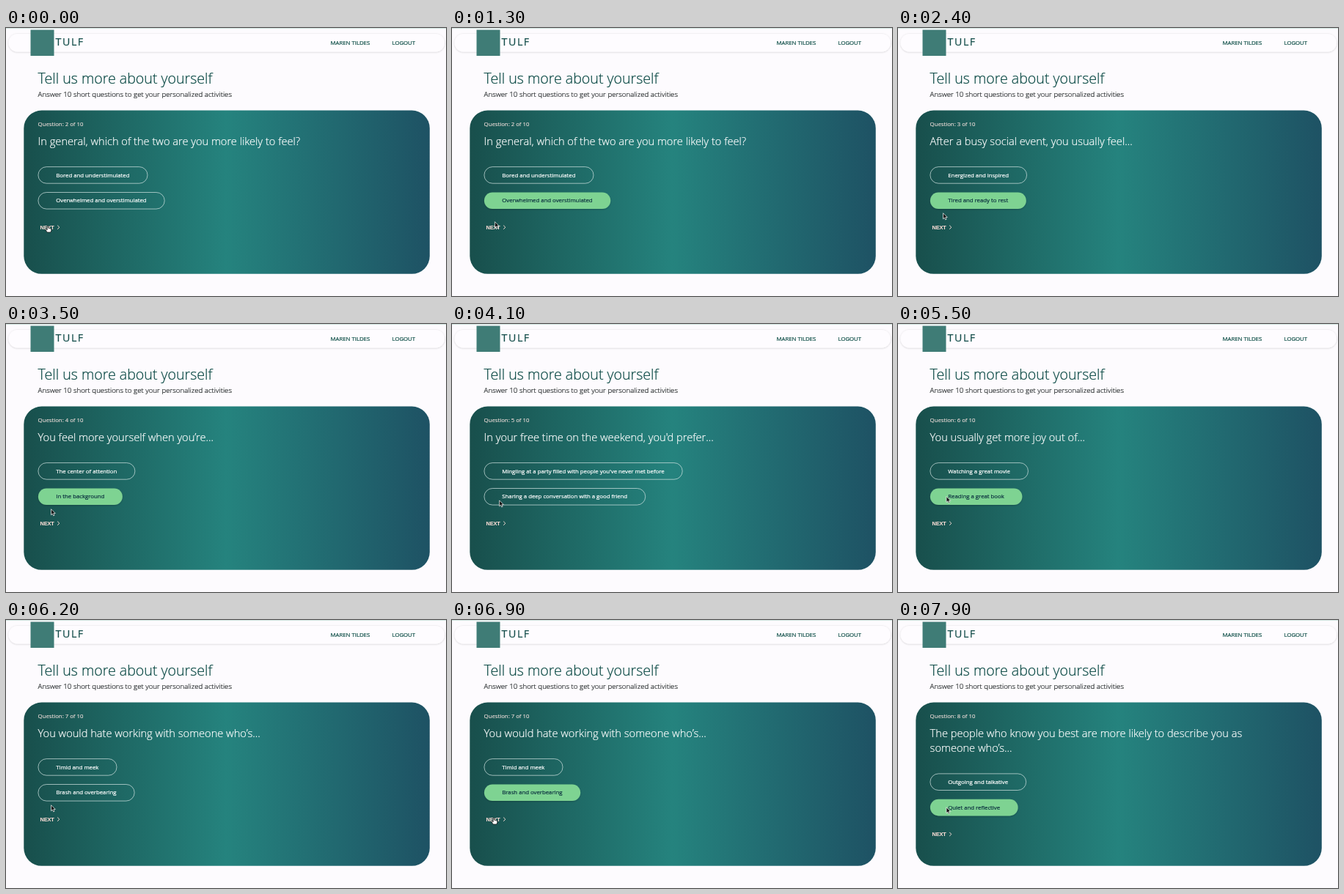
Animation, 600 px wide and 366 px high, one loop 8000 ms. Source, as an HTML page:

```html
<!DOCTYPE html>
<html lang="en">
<head>
<meta charset="utf-8">
<title>Questionnaire</title>
<style>
  html, body { margin: 0; width: 100%; height: 100%; overflow: hidden; background: #fdfbfe; }
  svg { display: block; width: 600px; height: 366px; font: 400 7.77px "Open Sans", sans-serif; }
  text { fill: var(--ink); stroke: var(--ink); stroke-width: .22; }
  .nav { --ink: #0f4f48; }
  .brand { --ink: #17504d; font-size: 14.2px; letter-spacing: 1.6px; }
  .title { --ink: #0b4a45; font-size: 19.6px; font-weight: 300; }
  .intro { --ink: #262b2c; font-size: 9.71px; font-weight: 300; }
  .count { --ink: #f7e3df; stroke-width: .12; }
  .question { --ink: #fff; font-size: 14.63px; font-weight: 300; }
  .option { --ink: #fff; }
  .option rect { fill: none; stroke: #d5e6e4; stroke-width: .7; }
  .option.on { --ink: #0d3341; }
  .option.on rect { fill: #7ed392; stroke: none; filter: url(#soft); }
  .next { --ink: #f8dcd5; font: 700 7.29px "Liberation Sans", Arial, sans-serif; stroke-width: .1; }
</style>
</head>
<body>
<svg viewBox="0 0 600 366">
  <defs>
    <linearGradient id="teal">
      <stop offset="0" stop-color="#184f4c"/>
      <stop offset=".5" stop-color="#25837e"/>
      <stop offset="1" stop-color="#1e5264"/>
    </linearGradient>
    <filter id="soft" x="-10%" y="-30%" width="120%" height="180%">
      <feDropShadow dx="0" dy="1" stdDeviation="1" flood-color="#000" flood-opacity=".22"/>
    </filter>
    <filter id="lift" x="-2%" y="-20%" width="104%" height="150%">
      <feDropShadow dx="0" dy=".5" stdDeviation=".8" flood-color="#000" flood-opacity=".2"/>
    </filter>
  </defs>

  <rect width="600" height="366" fill="#fdfbfe"/>
  <rect width="600" height="1" fill="#d3e6e2"/>
  <rect x="3.5" y="8" width="594.5" height="24.5" rx="12.25" fill="#fefcff" filter="url(#lift)"/>
  <rect x="33.5" y="2.5" width="32" height="35.5" fill="#3f7c76"/>
  <text class="brand" x="67.5" y="24.3">TULF</text>
  <text class="nav" x="442.5" y="23.2">MAREN TILDES</text>
  <text class="nav" x="526.5" y="23.2">LOGOUT</text>

  <text class="title" x="43.6" y="76">Tell us more about yourself</text>
  <text class="intro" x="43.6" y="94.2">Answer 10 short questions to get your personalized activities</text>

  <rect x="24.3" y="112.6" width="553.5" height="223.2" rx="24.3" fill="url(#teal)"/>
  <text class="count" id="count" x="43.6" y="133.8"></text>
  <text class="question" id="line0" x="43.6" y="159.8"></text>
  <text class="question" id="line1" x="43.6" y="179.8"></text>

  <g id="controls">
    <g class="option" id="option0">
      <rect x="43.9" y="189.6" height="22.6" rx="11.3"/>
      <text x="68.3" y="203.8"></text>
    </g>
    <g class="option" id="option1">
      <rect x="43.9" y="224.5" height="22.6" rx="11.3"/>
      <text x="68.3" y="238.4"></text>
    </g>
    <text class="next" x="46.4" y="274.7">NEXT</text>
    <path d="M70.2 269.6 72.8 272.2 70.2 274.8" fill="none" stroke="#f8dcd5" stroke-width="1"/>
  </g>

  <path id="arrow" d="M0 0V8L1.8 6.3 3.1 9.1 4.5 8.5 3.3 5.8H5.8Z"
        fill="#111" stroke="#fff" stroke-width=".7" stroke-linejoin="round"/>
  <path id="hand" d="M-.9 .7Q0-.6 .8 .7V3.2L2.2 3.4 3.6 3.9 4.8 4.6V6.6L3.9 9H-.8L-3.2 5.6Q-3.1 4.4-2 5L-.9 5.9Z"
        fill="#fff" stroke="#151515" stroke-width=".8" stroke-linejoin="round"/>
</svg>

<script>
const LOOP = 8000, STEP = 100;
const PICK = 500;      // wait before the second option is chosen
const TRAVEL = 400;    // pointer time between option and NEXT
const LINE = 20.3;     // shift of the controls per extra question line
const OPTION = { x: 66, y: 235.5 }, NEXT = { x: 57, y: 270 };

const questions = [
  { from: 0, lines: ["In general, which of the two are you more likely to feel?"],
    options: ["Bored and understimulated", "Overwhelmed and overstimulated"] },
  { from: 1600, lines: ["After a busy social event, you usually feel…"],
    options: ["Energized and inspired", "Tired and ready to rest"] },
  { from: 2700, lines: ["You feel more yourself when you’re…"],
    options: ["The center of attention", "In the background"] },
  { from: 3700, lines: ["In your free time on the weekend, you'd prefer…"],
    options: ["Mingling at a party filled with people you've never met before",
              "Sharing a deep conversation with a good friend"] },
  { from: 4900, lines: ["You usually get more joy out of…"],
    options: ["Watching a great movie", "Reading a great book"] },
  { from: 5900, lines: ["You would hate working with someone who’s…"],
    options: ["Timid and meek", "Brash and overbearing"] },
  { from: 7100,
    lines: ["The people who know you best are more likely to describe you as", "someone who’s…"],
    options: ["Outgoing and talkative", "Quiet and reflective"] }
];

const el = id => document.getElementById(id);
const show = (node, visible) => node.setAttribute("visibility", visible ? "visible" : "hidden");
const move = (node, x, y) => node.setAttribute("transform", `translate(${x} ${y})`);
const mix = (a, b, p) => a + (b - a) * p;
const ease = (t, start) => {
  const p = Math.min(1, Math.max(0, (t - start) / TRAVEL));
  return p * p * (3 - 2 * p);
};

// From NEXT up to the option, a short rest, and back before the question ends.
function pointerAt(age, length, shift) {
  const leave = Math.max(PICK + 100, length - TRAVEL - 200);
  const p = ease(age, PICK - TRAVEL) - ease(age, leave);
  return [mix(NEXT.x, OPTION.x, p), mix(NEXT.y, OPTION.y + shift, p)];
}

function setQuestion(index) {
  const { lines, options } = questions[index];
  el("count").textContent = `Question: ${index + 2} of 10`;
  [0, 1].forEach(i => {
    el("line" + i).textContent = lines[i] || "";
    const [pill, label] = el("option" + i).children;
    label.textContent = options[i];
    pill.setAttribute("width", label.getComputedTextLength() + 49);
  });
}

let current = -1;

function draw(time) {
  const t = Math.floor(time % LOOP / STEP) * STEP;
  const index = questions.filter(q => q.from <= t).length - 1;
  const { from, lines } = questions[index];
  const end = index + 1 < questions.length ? questions[index + 1].from : from + 2 * LOOP;
  if (index !== current) setQuestion(current = index);

  const shift = (lines.length - 1) * LINE;
  move(el("controls"), 0, shift);
  el("option1").classList.toggle("on", t >= from + PICK);

  const [x, y] = pointerAt(t - from, end - from, shift);
  const overNext = Math.abs(y - 272 - shift) < 5.3;
  show(el("hand"), overNext);
  show(el("arrow"), !overNext);
  move(el(overNext ? "hand" : "arrow"), x, y);
}

const start = performance.now();
function tick() {
  draw(performance.now() - start);
  requestAnimationFrame(tick);
}
tick();
</script>
</body>
</html>
```
